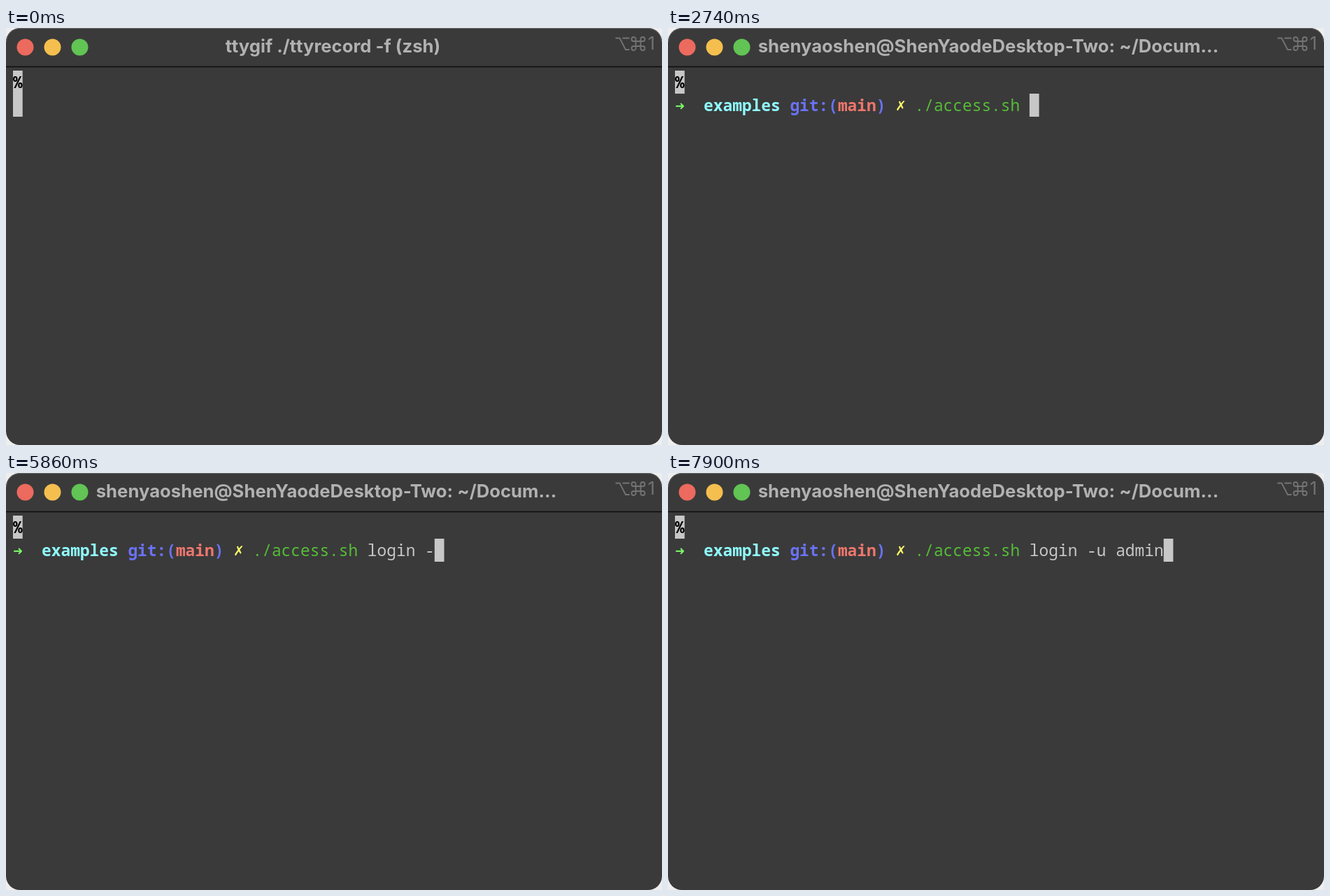
Animation, 938 px wide and 597 px high, one loop 8 s. Source, as an HTML page:

```html
<!DOCTYPE html>
<html lang="en">
<head>
<meta charset="utf-8">
<title>Terminal login</title>
<style>
  html, body { margin: 0; width: 100%; height: 100%; overflow: hidden; background: #eee; }
  svg { display: block; width: 938px; height: 597px; }
  text { white-space: pre; }
  .mono { font: 22.83px "Noto Sans Mono", monospace; fill: #c7c7c7; }
  .bold { font-weight: 700; }
  .sign { font-family: "DejaVu Sans", sans-serif; }
  #title { font: 700 25.7px Inter, sans-serif; fill: #b1b1b1; text-anchor: middle; }
  .hint { font: 25px Inter, sans-serif; fill: #747474; text-anchor: end; }
</style>
</head>
<body>
<svg viewBox="0 0 938 597">
  <rect width="938" height="597" rx="20" fill="#3a3a3a"/>
  <path d="M0 55.5H938" stroke="#0c0c0c" stroke-width="1.5"/>
  <path d="M.5 20A19.5 19.5 0 0 1 20 .5H918A19.5 19.5 0 0 1 937.5 20" fill="none" stroke="#666"/>
  <circle cx="27.5" cy="27.5" r="12" fill="#ec6a5e"/>
  <circle cx="66.5" cy="27.5" r="12" fill="#f4bf4f"/>
  <circle cx="105.5" cy="27.5" r="12" fill="#61c454"/>
  <text id="title" y="35"></text>
  <g fill="none" stroke="#747474" stroke-width="1.8">
    <path d="M871.5 14.5h6l8.500 16.500h5.500M881.500 14.500h10"/>
    <path d="M900.500 19h-3a3 3 0 1 1 3-3v13a3 3 0 1 1-3-3h13a3 3 0 1 1-3 3v-13a3 3 0 1 1 3 3z"/>
  </g>
  <text class="hint" x="928" y="31">1</text>

  <rect x="10" y="61" width="13.7" height="33" fill="#c7c7c7"/>
  <text class="mono bold" x="10" y="86" style="fill:#000">%</text>
  <g id="prompt" class="mono bold">
    <text class="sign" x="10" y="117" font-size="17" fill="#7bf967">➜</text>
    <text x="51.1" y="119" fill="#8ffafd">examples</text>
    <text x="174.4" y="119" fill="#6a72f5">git:(<tspan fill="#ee766d">main</tspan>)</text>
    <text class="sign" x="325" y="118" font-size="19" fill="#fffb67">✗</text>
  </g>
  <text class="mono" x="352.5" y="119"><tspan id="program"></tspan><tspan id="args"></tspan></text>
  <rect id="underline" x="352.5" y="123" height="1.500"/>
  <rect id="cursor" y="94" width="13.7" height="33" fill="#c7c7c7"/>
</svg>
<script>
const LOOP = 8000, CELL = 13.7, PROMPT_AT = 70, TAB_AT = 2740;
const GREEN = '#56bc38', GREY = '#c7c7c7';
const COMMAND = './access.sh login -u admin', PROGRAM_LENGTH = 11;
const keyTimes = [
  1660, 1810, 1950, 2120, 2330, 2450, TAB_AT, 4820, 4960, 5160, 5340,
  5520, 5730, 5860, 6080, 6650, 7260, 7460, 7590, 7730, 7900
];
const $ = id => document.getElementById(id);

function setTitle(text, x) {
  $('title').textContent = text;
  $('title').setAttribute('x', x);
}

function draw(t) {
  const ready = t >= PROMPT_AT, completed = t >= TAB_AT;
  // The tab key fills in five characters beyond its own.
  const typed = keyTimes.filter(time => time <= t).length + (completed ? 5 : 0);
  const color = completed || typed < 3 ? GREEN : GREY;

  if (ready) setTitle('shenyaoshen@ShenYaodeDesktop-Two: ~/Docum...', 458);
  else setTitle('ttygif ./ttyrecord -f (zsh)', 467.5);
  $('prompt').style.display = ready ? '' : 'none';

  $('program').textContent = COMMAND.slice(0, Math.min(typed, PROGRAM_LENGTH));
  $('program').style.fill = color;
  $('args').textContent = COMMAND.slice(PROGRAM_LENGTH, Math.max(typed, PROGRAM_LENGTH));
  $('underline').setAttribute('width', typed > 1 && !completed ? typed * CELL : 0);
  $('underline').style.fill = color;
  $('cursor').setAttribute('x', 10 + CELL * (ready ? 25 + typed : 0));
}

function tick() {
  draw(performance.now() % LOOP);
  requestAnimationFrame(tick);
}
tick();
</script>
</body>
</html>
```
